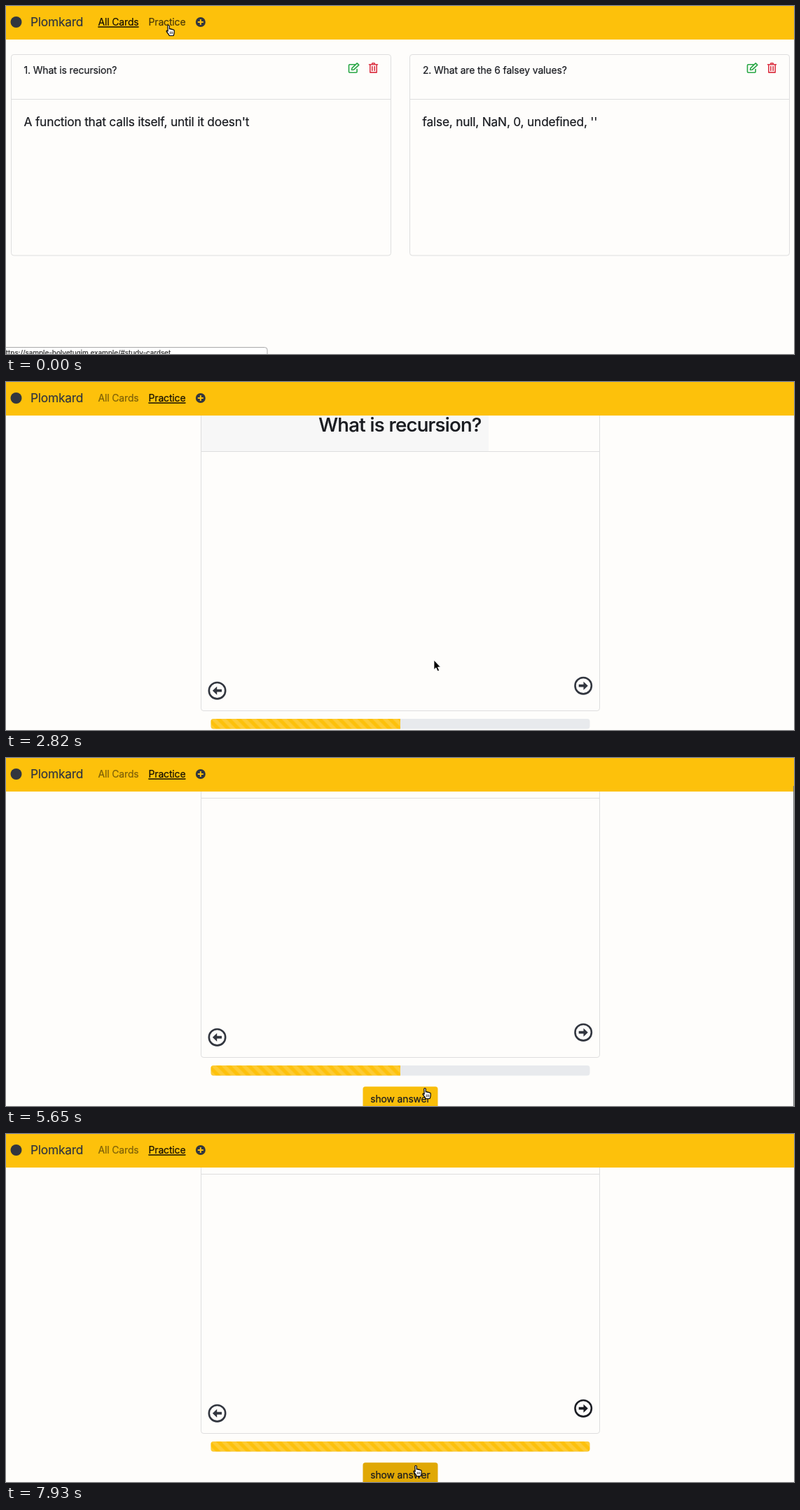
These frames come from a looping animation (1125x498 px, 8 s). An HTML page:

```html
<!DOCTYPE html>
<html lang="en">
<head>
<meta charset="utf-8">
<title>Flash cards</title>
<style>
  html, body { margin: 0; width: 100%; height: 100%; overflow: hidden; background: #fefdfb; }
  svg { display: block; width: 100vw; height: 100vh; }
  text {
    font-family: Inter, "Liberation Sans", sans-serif; font-optical-sizing: none; white-space: pre;
    color: #191b20; fill: currentColor; stroke: currentColor; stroke-width: .22;
  }
  .small { font-size: 13.9px; letter-spacing: -.008em; }
  .body { font-size: 17.3px; letter-spacing: -.011em; }
  .title { font-size: 27.7px; font-weight: 500; letter-spacing: -.027em; }
  .answer { font-size: 34.8px; letter-spacing: -.0225em; }
  .url { font-size: 10px; letter-spacing: -.005em; color: #333; }
  .mid { text-anchor: middle; }
  .line { fill: none; stroke: #dedede; }
  .icon { fill: none; stroke-width: 1.6; stroke-linejoin: round; stroke-linecap: round; }
</style>
</head>
<body>
<svg viewBox="0 0 1125 498">
  <defs>
    <pattern id="stripes" x="292.5" y="482" width="14.4" height="14.4" patternUnits="userSpaceOnUse">
      <rect width="14.4" height="14.4" fill="#fdc10b"/>
      <path d="M0 7.2V14.4H7.2ZM0 0H7.2L14.4 7.2V14.4Z" fill="#fff" fill-opacity=".17"/>
    </pattern>
    <clipPath id="track"><rect x="292.5" y="482" width="541" height="14.4" rx="3.6"/></clipPath>
    <g id="frame">
      <rect class="line" x="7.5" y="69.5" width="542" height="287.5" rx="3.6"/>
      <path class="line" d="M7.5 133.5H549.5"/>
      <path class="icon" stroke="#28a745" transform="translate(496.5 88.5)"
        d="M1.5 -4.8H-5.8Q-7 -4.8 -7 -3.6V5.6Q-7 6.8 -5.8 6.8H3.4Q4.6 6.8 4.6 5.6V2M-3 3L-2.5 .3L4.7 -6.6L7.3 -4.2L0 2.7Z"/>
      <path class="icon" stroke="#dc3545" transform="translate(524.5 88.5)"
        d="M-6 -4.8H6M-2.2 -5L-1.5 -6.8H1.5L2.2 -5M-4.7 -4.8V6.6H4.7V-4.8M-1.7 -2V4M1.7 -2V4"/>
    </g>
    <g id="arrow">
      <circle r="11.7" fill="none" stroke="currentColor" stroke-width="2.6"/>
      <path d="M-6.5 -1.9H.3V-6L6.6 0L.3 6V1.9H-6.5Z" fill="currentColor"/>
    </g>
  </defs>

  <g id="list">
    <use href="#frame"/>
    <use href="#frame" x="569"/>
    <text class="small" x="25.5" y="97">1. What is recursion?</text>
    <text class="body" x="25.5" y="171.5">A function that calls itself, until it doesn't</text>
    <text class="small" x="595" y="97">2. What are the 6 falsey values?</text>
    <text class="body" x="594.5" y="171.5">false, null, NaN, 0, undefined, ''</text>
  </g>

  <g id="practice">
    <rect id="head" x="279" y="48" width="410" height="51" fill="#f7f7f7"/>
    <rect class="line" x="278.5" y="20.5" width="569" height="450" rx="3.6"/>
    <path class="line" d="M278.5 99.5H847.5"/>
    <text class="title mid" x="562.5" y="71">What is recursion?</text>
    <g id="answer">
      <text class="answer mid" x="562.5" y="207.5">A function that calls itself, until it</text>
      <text class="answer mid" x="562.5" y="261">doesn't</text>
    </g>
    <use href="#arrow" transform="translate(301.5 441.7) scale(-1 1)" color="#32363f"/>
    <use id="next" href="#arrow" transform="translate(824.2 434.7)"/>
    <g clip-path="url(#track)">
      <rect x="292" y="482" width="542" height="15" fill="#e8eaed"/>
      <rect id="bar" x="292" y="482" height="15" fill="url(#stripes)"/>
    </g>
    <rect id="button" x="509.5" y="512.3" width="107" height="34" rx="3.6"/>
    <text class="small mid" x="563" y="534.7">show answer</text>
  </g>

  <rect width="1125" height="48" fill="#fdc10b"/>
  <circle cx="14.5" cy="23" r="8" fill="#32363f"/>
  <text class="body" x="35" y="29.3" style="color:#32363f">Plomkard</text>
  <text class="small" id="navList" x="131.5" y="28.3">All Cards</text>
  <text class="small" id="navPractice" x="203.5" y="28.3">Practice</text>
  <circle cx="277.8" cy="23" r="7" fill="#32363f"/>
  <path d="M273.8 23H281.8M277.8 19V27" stroke="#fdc10b" stroke-width="2"/>

  <rect id="scrollbar" x="1124" y="40" width="1" height="458" fill="#777"/>
  <g id="status">
    <rect x="-5" y="488.5" width="378" height="20" rx="3.6" fill="#fff" stroke="#a9a9a9"/>
    <text class="url" x="-6" y="499.7">https://sample-bolvetuqim.example/#study-cardset</text>
  </g>

  <g id="cursor">
    <path id="pointer" d="M0 0V13.6L3 10.8L5.2 15.8L7.6 14.8L5.4 10H9.4Z" fill="#000" stroke="#fff" stroke-width=".8"/>
    <g id="hand" transform="translate(-3.2 0)" stroke="#000" fill="#fff" stroke-linejoin="round">
      <path d="M2 2Q2 .5 3.2 .5Q4.5 .5 4.5 2V6Q6.5 5.2 7 6.4Q8.8 5.8 9.2 7Q11.4 6.6 11.4 8.6V11Q11.4 13 10.2 15.5H4.5Q3 12.5 .6 10Q-.3 8.4 1.2 8.2L2.4 9.2Z" stroke-width="1.2"/>
      <path d="M5.4 9.5V13M7.2 9.5V13M9 9.5V13" stroke-width=".7"/>
    </g>
  </g>
</svg>
<script>
const LOOP = 8000, OPEN = 1190, SCROLL = 5020, SHOW = 6000, NEXT = 7030;

// time, x, y of the cursor tip
const path = [
  [0, 232, 27], [780, 232, 27], [900, 231, 26], [1430, 231, 26], [1580, 692, 292],
  [1730, 692, 292], [1900, 820, 404], [2030, 826, 409], [2510, 685, 402], [2820, 611, 398],
  [3710, 611, 398], [4080, 452, 338], [4140, 449, 325], [4230, 490, 262], [4330, 660, 320],
  [4470, 825, 452], [4730, 825, 452], [4850, 778, 443], [5410, 778, 443], [5640, 598, 472],
  [6270, 598, 472], [6500, 904, 378], [6600, 880, 396], [6800, 833, 393], [7090, 833, 393],
  [7870, 585, 474], [LOOP, 585, 474]
];

const $ = id => document.getElementById(id);
const show = (id, on) => $(id).setAttribute("display", on ? "inline" : "none");
const ramp = (t, start, length) => Math.min(1, Math.max(0, (t - start) / length));
const within = (t, a, b) => t >= a && t < b;
const mix = (a, b, k) => a + (b - a) * k;
const smooth = k => k * k * (3 - 2 * k);

function cursorAt(t) {
  const i = path.findIndex(p => p[0] > t);
  const [t0, x0, y0] = path[i - 1], [t1, x1, y1] = path[i];
  const k = (t - t0) / (t1 - t0);
  return [mix(x0, x1, k), mix(y0, y1, k)];
}

function navLink(id, active, idle) {
  $(id).style.color = active ? "#151004" : idle;
  $(id).style.textDecoration = active ? "underline" : "none";
}

function draw(t) {
  const practice = t >= OPEN;
  show("list", !practice);
  show("practice", practice);
  navLink("navList", !practice, "#7e6109");
  navLink("navPractice", practice, "#4d3b08");

  const steps = t < SCROLL ? 0 : Math.min(3, 1 + Math.floor((t - SCROLL) / 60));
  $("practice").setAttribute("transform", `translate(0 ${-14 * steps})`);
  show("head", steps === 0);
  show("scrollbar", within(t, SCROLL, 6100));
  show("answer", within(t, SHOW, NEXT));
  $("next").setAttribute("color", t < 6780 ? "#32363f" : "#1b1d23");
  $("bar").setAttribute("width", mix(271, 542, smooth(ramp(t, NEXT, 600))));

  const hover = ramp(t, 5630, 150) - ramp(t, 6310, 150) + ramp(t, 7780, 150);
  $("button").setAttribute("fill", `rgb(${mix(253, 224, hover)},${mix(193, 168, hover)},${mix(11, 5, hover)})`);

  $("status").setAttribute("opacity", 1 - ramp(t, 1730, 150) + ramp(t, 6720, 130) - ramp(t, 7250, 200));

  const hand = t < 1430 || within(t, 5610, 6310) || within(t, 6760, 7150) || t >= 7770;
  show("hand", hand);
  show("pointer", !hand);
  $("cursor").setAttribute("transform", `translate(${cursorAt(t)})`);
}

function tick() {
  draw(performance.now() % LOOP);
  requestAnimationFrame(tick);
}
tick();
</script>
</body>
</html>
```
